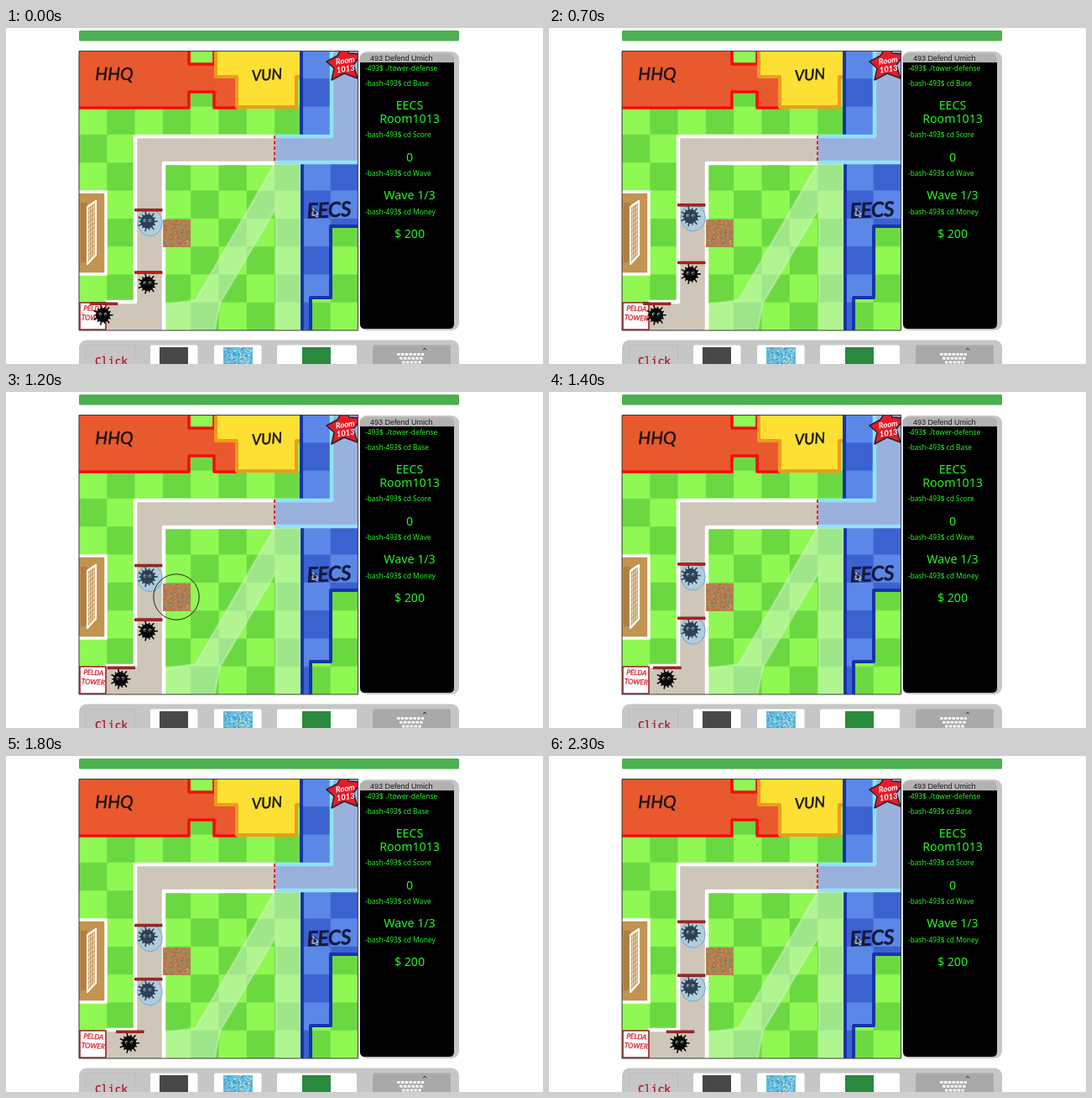
An HTML page for the animation above (2400 ms loop, 640x400 px).

```html
<!DOCTYPE html>
<html lang="en">
<head>
<meta charset="utf-8">
<title>Tower defense</title>
<style>
  html, body { margin: 0; width: 100%; height: 100%; overflow: hidden; background: #fff; }
  svg { display: block; width: 640px; height: 400px; }
  .term { font: 8.4px "Noto Sans", "Open Sans", sans-serif; fill: #25f425; }
  .big { font-size: 14.2px; text-anchor: middle; }
  .hand { font-family: Lato, "Open Sans", sans-serif; font-style: italic; text-anchor: middle; }
  .line { fill: none; stroke-linejoin: round; }
</style>
</head>
<body>
<svg viewBox="0 0 640 400" xmlns="http://www.w3.org/2000/svg">
  <defs>
    <pattern id="grass" x="87" y="27" width="66.6" height="66.6" patternUnits="userSpaceOnUse">
      <path fill="#8ff853" d="M0 0h66.6v66.6H0z"/>
      <path fill="#6bd842" d="M33.3 0h33.3v33.3H33.3zM0 33.3h33.3v33.3H0z"/>
    </pattern>
    <pattern id="tiles" x="87" y="27" width="66.6" height="66.6" patternUnits="userSpaceOnUse">
      <path fill="#5b87e6" d="M0 0h66.6v66.6H0z"/>
      <path fill="#3c62d2" d="M33.3 0h33.3v33.3H33.3zM0 33.3h33.3v33.3H0z"/>
    </pattern>
    <clipPath id="field"><path d="M87 27h333v333H87z"/></clipPath>
    <g id="bug">
      <path id="fur" stroke-width="1.6" stroke-linecap="round"/>
      <circle r="8"/>
      <circle cx="-3.2" cy="-1" r="2.1" fill="#fff"/>
      <circle cx="3" cy="-1" r="2.1" fill="#fff"/>
      <path d="M-3.6-1.4h1.3v1.3h-1.3zM2.4-1.4h1.3v1.3H2.4z" fill="#111"/>
    </g>
    <path id="life" d="M-16.3-1.3h32.6v2.6h-32.6z" fill="#d81a1a" stroke="#5c1010" stroke-width=".8"/>
  </defs>

  <rect x="87" y="3" width="453" height="12.5" rx="1.5" fill="#4caf50"/>

  <g clip-path="url(#field)">
    <path fill="url(#grass)" d="M87 27h333v333H87z"/>

    <!-- pale footpaths -->
    <path fill="#d3f3cf" fill-opacity=".5" stroke="#d0f5bf" stroke-opacity=".45" stroke-width="2.5"
      d="M190 329L226 324L320 162H351V362H322V214L255 327L248 362H190z"/>

    <!-- grey road -->
    <path fill="#cdc6b9" d="M87 327H154V129H321V161H188V361H87z"/>
    <path class="line" stroke="#fff" stroke-width="4.5" d="M118 326H154V129H320M188 361V161H320"/>

    <!-- left hall -->
    <path fill="#e9592e" d="M87 27H218V43H248V27H276V95H248V76H218V95H87z"/>
    <path class="line" stroke="#f50c0c" stroke-width="3.6" d="M218 27V43H248V27M87 95H218V76H248V95H275"/>
    <!-- middle hall -->
    <path fill="#fce033" stroke="#f09a1c" stroke-width="4" stroke-linejoin="round"
      d="M250 24H352V58H346V94H275V58H250z"/>

    <!-- blue hall -->
    <path fill="url(#tiles)" d="M353 27H421V236H387V320H363V361H353z"/>
    <path class="line" stroke="#1734a6" stroke-width="4" d="M352 27V128M353 161V361M421 236H387V321H363V361"/>
    <path fill="#9ab1dd" d="M388 27H421V160H321V128H388z"/>
    <path class="line" stroke="#8fe3fb" stroke-width="4.5" d="M388 27V129H321M321 160H421"/>
    <path stroke="#e01b2c" stroke-width="2" stroke-dasharray="4 2.5" d="M320 128V160"/>

    <!-- goal -->
    <path fill="#c39350" stroke="#fff" stroke-width="3.5" d="M83 195H119V293H83z"/>
    <path fill="#b27d3c" d="M89 208H97V279H89z"/>
    <path id="net" class="line" stroke="#efe3cc" stroke-width=".8"/>
    <path class="line" stroke="#fff" stroke-width="2.2" d="M97 281V213L107 206V270z"/>

    <!-- star -->
    <path fill="#e21d2a" stroke="#26222c" stroke-width="1.5" stroke-linejoin="round"
      d="M403 19L409 30L424 31L414 44L419 60L403 54L388 62L391 48L382 40L395 33z"/>
    <g class="hand" fill="#fff" font-weight="700" transform="rotate(-8 404 44)">
      <text x="405" y="42" font-size="9.5">Room</text>
      <text x="404" y="52" font-size="9.5">1013</text>
    </g>

    <g class="hand" fill="#1c1512" stroke="#1c1512" stroke-width=".5">
      <text x="129" y="62" font-size="21" textLength="auto">HHQ</text>
      <text x="311" y="62" font-size="18" transform="rotate(-4 311 56)">VUN</text>
      <text x="385" y="225" font-size="24" stroke-width="1.2" fill="#141b3c" stroke="#141b3c"
        transform="rotate(-3 385 216)">EECS</text>
    </g>

    <!-- sign -->
    <path fill="#fff" stroke="#a51c26" stroke-width="1.6" d="M88 327H119V359H88z"/>
    <g class="hand" fill="#d9202c" stroke="#d9202c" stroke-width=".3" font-size="8.4" transform="rotate(3 104 342)">
      <text x="104" y="337">PELDA</text>
      <text x="104" y="348">TOWER</text>
    </g>

    <!-- placed tower -->
    <path fill="#b5814f" d="M187 228H220V261H187z"/>
    <g id="bark"></g>

    <g id="bugs"></g>
    <circle id="pulse" cx="203" cy="244" fill="none" stroke="#222" stroke-width="1"/>
    <path fill="#151515" stroke="#fff" stroke-width=".8" d="M366 215V224L368 222L369.6 225L371 224.3L369.6 221.4H372z"/>
  </g>
  <path class="line" stroke="#3b3b3b" d="M87 27.5H419.5V360H87z"/>

  <!-- terminal -->
  <rect x="421" y="28" width="119" height="332" rx="9" fill="#c6c6c6"/>
  <path fill="#b2b2b2" d="M422 41V37q0-7 7-7H527q7 0 7 7V41z"/>
  <path d="M422 41H534V352q0 6-6 6H428q-6 0-6-6z"/>
  <text x="434" y="38.7" font-size="9" fill="#1d1d1d" font-family="Liberation Sans, Arial, sans-serif">493 Defend Umich</text>
  <g class="term">
    <text x="428" y="50.5">-493$ ./tower-defense</text>
    <text x="428" y="68.5">-bash-493$ cd Base</text>
    <text x="428" y="130">-bash-493$ cd Score</text>
    <text x="428" y="176">-bash-493$ cd Wave</text>
    <text x="428" y="221.5">-bash-493$ cd Money</text>
    <g class="big">
      <text x="481" y="97">EECS</text>
      <text x="481" y="112.5">Room1013</text>
      <text x="481" y="158.5">0</text>
      <text x="481" y="204">Wave 1/3</text>
      <text x="481" y="250">$ 200</text>
    </g>
  </g>

  <!-- shop -->
  <rect x="87" y="371.5" width="453" height="40" rx="9" fill="#c6c6c6"/>
  <path class="line" stroke="#bcbcbc" d="M95.5 401V377.5H153.5V401"/>
  <text x="106" y="401" font-size="13" fill="#b3152a" stroke="#b3152a" stroke-width=".3"
    font-family="DejaVu Sans Mono, monospace">Click</text>
  <g fill="#fff">
    <rect x="172" y="377.5" width="56.5" height="30" rx="2"/>
    <rect x="248" y="377.5" width="56.5" height="30" rx="2"/>
    <rect x="323" y="377.5" width="95" height="30" rx="2"/>
  </g>
  <rect x="437" y="377.5" width="93" height="30" rx="2" fill="#a9a9a9"/>
  <rect x="183" y="380" width="34" height="34" fill="#484848"/>
  <path fill="#62bce0" d="M259 380H294V400H259z"/>
  <g id="ice"></g>
  <rect x="353" y="380" width="34" height="34" fill="#2a8a3e"/>
  <path class="line" stroke="#f4f4f4" stroke-width="3" stroke-dasharray="3.6 1.2"
    d="M466 388.5H498M469 393.2H497M472 398H496"/>
  <path class="line" stroke="#333" d="M497 383.5L499 381L501 383.5"/>
</svg>
<script>
const $ = id => document.getElementById(id);
const LOOP = 2400, STEP = 100;

let seed = 7;
const rand = () => (seed = seed * 16807 % 2147483647) / 2147483647;

// short random brush marks inside a box
function speckle(id, x, y, w, h, colors, perColor) {
  $(id).innerHTML = colors.map(color => {
    let d = '';
    for (let i = 0; i < perColor; i++) {
      const px = x + 1 + rand() * (w - 3), py = y + 1 + rand() * (h - 3);
      d += `M${px.toFixed(1)} ${py.toFixed(1)}l1.6 ${(rand() * 3 - 1.5).toFixed(1)}`;
    }
    return `<path d="${d}" stroke="${color}" stroke-width="1.1"/>`;
  }).join('');
}
speckle('bark', 187, 228, 33, 33, ['#8b6a4a', '#d3955b', '#67947e', '#c4664a'], 65);
speckle('ice', 259, 380, 35, 22, ['#2b9bd0', '#a5deed', '#4789b0', '#d7e4d4'], 40);

let fur = '';
for (let i = 0; i < 14; i++) {
  const a = i * Math.PI / 7, r = i % 2 ? 9.5 : 11.5;
  fur += `M0 0L${(r * Math.cos(a)).toFixed(1)} ${(r * Math.sin(a)).toFixed(1)}`;
}
$('fur').setAttribute('d', fur);

let net = '';
for (let i = 1; i < 12; i++) net += `M97 ${213 + i * 5.6}L107 ${206 + i * 5.3}`;
for (let x = 99.5; x < 107; x += 2.5) net += `M${x} ${281 - (x - 97) * 1.1}V${213 - (x - 97) * .7}`;
$('net').setAttribute('d', net);

function bug(x, y, frozen) {
  const ice = '<ellipse cx="2" cy="15" rx="14.5" ry="16" fill="#a5cfe8" fill-opacity=".7" stroke="#65a8d8"/>';
  return `<g transform="translate(${x} ${y})">${frozen ? ice : ''}
    <use href="#bug" x="-1" y="13.5" fill="${frozen ? '#2c4056' : '#080808'}" stroke="${frozen ? '#2c4056' : '#080808'}"/>
    <use href="#life"/></g>`;
}

function draw() {
  const n = Math.floor(performance.now() % LOOP / STEP);
  const slowed = Math.max(0, n - 12);
  $('bugs').innerHTML =
    bug(169.7, 216.7 - .84 * n, true) +
    bug(169.7, 291 - 1.66 * (n - slowed) - .9 * slowed, n > 12) +
    bug(116.5 + 1.74 * n, 328.3, false);
  // the tower's pulse chills the second bug
  $('pulse').setAttribute('r', n > 10 && n < 14 ? 13.6 * (n - 10) : 0);
  requestAnimationFrame(draw);
}
draw();
</script>
</body>
</html>
```
